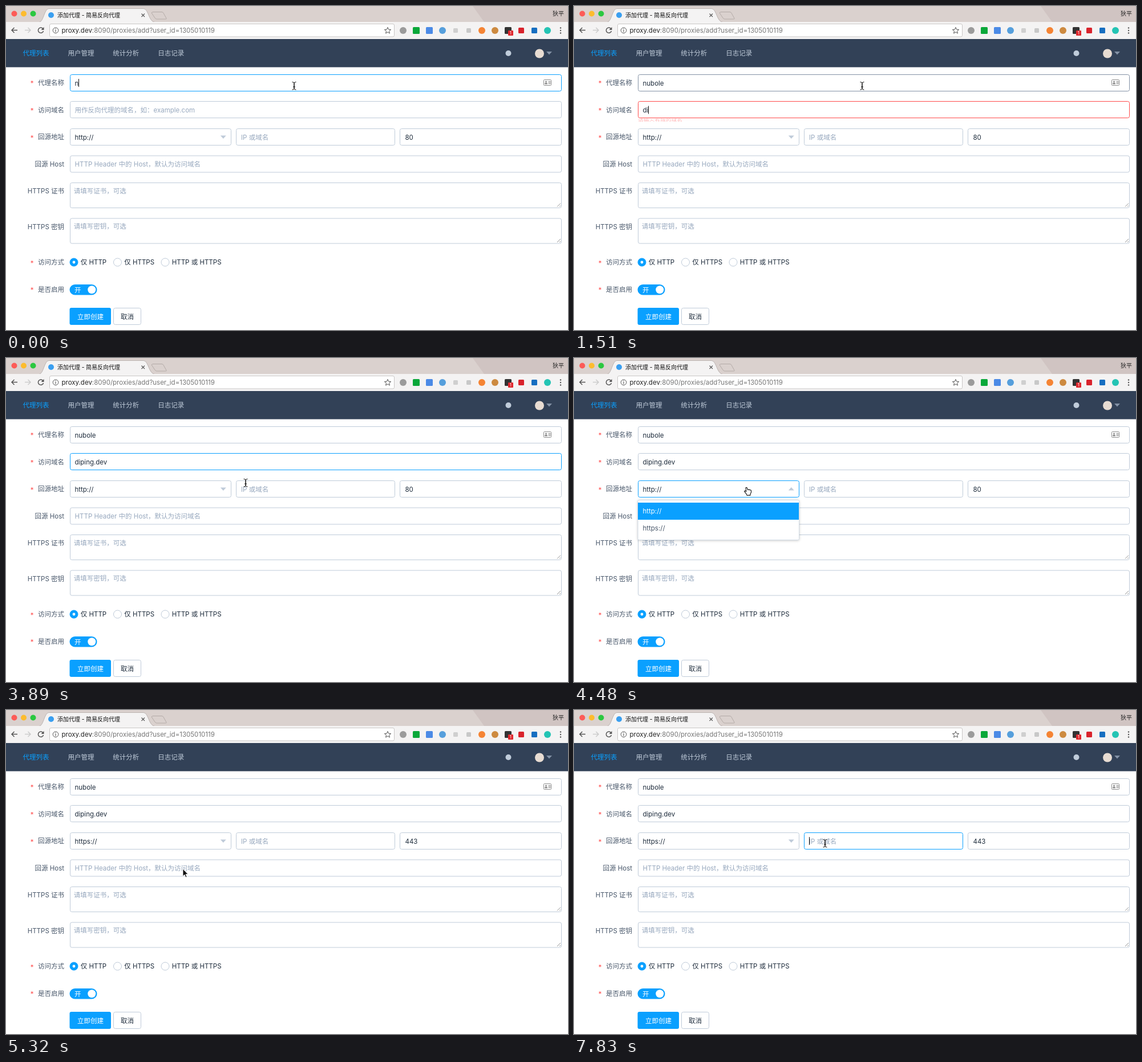
Write an HTML page that moves like this. It is 985 by 569 pixels and loops after 8 s.

```html
<!DOCTYPE html>
<html lang="zh-CN">
<head>
<meta charset="utf-8">
<title>添加代理</title>
<style>
  html, body { margin: 0; width: 100%; height: 100%; overflow: hidden; background: #fff; }
  svg { display: block; }
  text { font: 11.5px Inter, "Noto Sans CJK SC", "Noto Sans CJK", sans-serif; white-space: pre; }
  .small { font-size: 10px; }
  .error { font-size: 9.75px; }
</style>
</head>
<body>
<svg id="stage" width="985" height="569" viewBox="0 0 985 569"></svg>
<script>
const BLUE = '#0aa0ff', RED = '#ff4949', LINE = '#bfcbd9', HOVER = '#8391a5';
const INK = '#1f2d3d', LABEL = '#48576a', HINT = '#97a8be';
const LOOP = 8000;

const text = (x, y, s, fill = INK, extra = '') => `<text x="${x}" y="${y}" fill="${fill}" ${extra}>${s}</text>`;
const rect = (x, y, w, h, fill, extra = '') => `<rect x="${x}" y="${y}" width="${w}" height="${h}" fill="${fill}" ${extra}/>`;
const circle = (x, y, r, fill, extra = '') => `<circle cx="${x}" cy="${y}" r="${r}" fill="${fill}" ${extra}/>`;
const path = (d, stroke, extra = '') => `<path d="${d}" fill="none" stroke="${stroke}" ${extra}/>`;
const shape = (d, fill, extra = '') => `<path d="${d}" fill="${fill}" ${extra}/>`;
const box = (x, y, w, h = 29, id = '') => rect(x, y, w, h, '#fff', `id="${id}" rx="3" stroke="${LINE}"`);
const label = (y, s, required) =>
  text(102, y, s, LABEL, 'text-anchor="end"') + (required ? text(42.8, y + 1.5, '*', RED) : '');
const radio = (x, s, on) =>
  circle(x, 450, 7, on ? BLUE : '#fff', `stroke="${on ? BLUE : LINE}"`) +
  (on ? circle(x, 450, 2.4, '#fff') : '') + text(x + 11.7, 454.2, s);
const textarea = (y, s) => box(112.5, y, 861, 44) + text(118.8, y + 18.2, s, HINT) +
  path(`M966 ${y + 42}l6-6M970 ${y + 42}l2-2`, '#777', 'stroke-width=".8"');

function browser() {
  const icons = [
    [696, '#9b9b9b', 1], [719, '#0aa83a'], [742, '#4b8ae6'], [765, '#569fdc', 1],
    [788, '#cfcfcf', 0, 4], [811, '#c8c8c8', 0, 4], [834, '#f58434', 1], [857, '#cd8a40', 1],
    [880, '#333'], [903, '#d9232c', 0, 5], [926, '#176fc1', 0, 5], [949, '#24c4b4', 1]
  ];
  return rect(0, 0, 985, 28, '#dad1ce') + shape('M818 0H985V28H838Z', '#d0c4c2') +
    ['#fc5b57', '#fdbc2e', '#2bc840'].map((c, i) => circle(14.5 + 16.5 * i, 13.5, 5, c)).join('') +
    shape('M58 28.5C66 28 67 5 75 4.5H241C250 5 250 28 261 28.5Z', '#f4f3f3', 'stroke="#aaa19e" stroke-width=".7"') +
    path('M255 12q1-1.500 3-1.500h15q2 0 3 2l5 9q.8 1.500-1.500 1.500h-15q-2.500 0-3.500-2z', '#aaa19e', 'stroke-width=".8"') +
    rect(0, 28, 985, 30, '#f4f3f3') +
    circle(79, 16, 5, '#3a9ff0') +
    text(90, 19.8, '添加代理 - 简易反向代理', '#111', 'class="small" font-weight="500" style="font-weight:500"') +
    path('M237.500 13.500l5.500 5.500m0-5.500l-5.500 5.500', '#555', 'stroke-width="1.1"') +
    text(958, 17.2, '狄平', '#222', 'class="small"') +
    path('M20 42.500H10m4.500-4.500l-4.500 4.500 4.500 4.500', '#555', 'stroke-width="1.5"') +
    path('M33 42.500h10m-4.500-4.500l4.500 4.500-4.500 4.500', '#ccc', 'stroke-width="1.5"') +
    path('M65 40a4.700 4.700 0 1 0 .6 4', '#555', 'stroke-width="1.5"') + shape('M66.500 37v5h-5z', '#555') +
    rect(76.5, 31.5, 604, 22.5, '#fff', 'id="omnibox" rx="2.5"') +
    rect(97, 36, 276, 14, '#a9cef6', 'id="selection"') +
    circle(87, 42.800, 4.800, 'none', 'stroke="#555"') + path('M87 42v3.500M87 39.800v1.200', '#555', 'stroke-width="1.2"') +
    text(97.5, 47, '<tspan fill="#222">proxy.dev</tspan>:8090/proxies/add?user_id=1305010119', '#767676') +
    path('M669 37.500l1.600 3.700 4 .3-3.100 2.600 1 3.900-3.500-2.100-3.500 2.100 1-3.900-3.100-2.600 4-.3z', '#555') +
    icons.map(([x, c, round, r = 6]) =>
      round ? circle(x, 43, r, c) : rect(x - r, 43 - r, 2 * r, 2 * r, c, 'rx="1.5"')).join('') +
    rect(880, 43, 9, 9, '#e0282e', 'rx="1"') +
    text(882.7, 50.3, '1', '#fff', 'style="font-size:7.5px"') +
    [38.500, 43, 47.500].map(y => circle(972, y, 1.2, '#555')).join('');
}

function navigation() {
  return rect(0, 58, 985, 49.500, '#324157') +
    ['代理列表', '用户管理', '统计分析', '日志记录'].map((s, i) =>
      text(29.500 + 78.900 * i, 87.200, s, i ? LINE : BLUE)).join('') +
    circle(880.500, 83, 5, '#c0ccda') + circle(935, 83.500, 8, '#e8dcd2') +
    shape('M947 80h10l-5 5.500z', '#8492a6');
}

function form() {
  return label(138.800, '代理名称', 1) + box(112.5, 120.5, 861, 29, 'nameBox') + text(120.5, 139.500, '', INK, 'id="nameText"') +
    rect(942.500, 129.500, 13, 10, '#fff', 'rx="1" stroke="#8c8c8c"') + circle(946.500, 133, 1.400, '#8c8c8c') +
    shape('M944 137.500q0-3 2.500-3t2.500 3z', '#8c8c8c') + path('M950.500 132.500h4m-4 2h4m-4 2h4', '#8c8c8c') +
    label(186.500, '访问域名', 1) + box(112.5, 167.5, 861, 29, 'domainBox') +
    text(120.5, 187.200, '用作反向代理的域名，如：example.com', HINT, 'id="domainHint"') +
    text(120.5, 187.200, '', INK, 'id="domainText"') +
    path('', '#ee3b33', 'id="spelling" stroke-width="1.4" stroke-dasharray="1.5 1"') +
    `<g id="error">${text(112, 11.500, '请输入有效的域名', RED, 'class="error"')}</g>` +
    label(234.200, '回源地址', 1) + box(112.5, 215.5, 282, 29, 'selectBox') + text(120.5, 234.700, '', INK, 'id="schemeText"') +
    shape('M-5-2.500h10l-5 5.500z', LINE, 'id="arrow"') +
    box(403.5, 215.5, 278, 29, 'hostBox') + text(412, 234.700, 'IP 或域名', HINT) +
    box(690.5, 215.5, 283) + text(699.5, 234.700, '', INK, 'id="portText"') +
    label(281.700, '回源 Host') + box(112.5, 263, 861) + text(120.5, 282.300, 'HTTP Header 中的 Host，默认为访问域名', HINT) +
    label(329, 'HTTPS 证书') + textarea(310.5, '请填写证书，可选') +
    label(391.500, 'HTTPS 密钥') + textarea(373, '请填写密钥，可选') +
    label(454, '访问方式', 1) + radio(119, '仅 HTTP', 1) + radio(195.500, '仅 HTTPS') + radio(279, 'HTTP 或 HTTPS') +
    label(501.800, '是否启用', 1) + rect(111.500, 489, 48, 18.500, BLUE, 'rx="9.25"') +
    text(120, 502.500, '开', '#fff') + circle(150.300, 498.300, 7, '#fff') +
    rect(111.500, 530, 72.500, 30, BLUE, 'rx="3"') + text(125, 549.500, '立即创建', '#fff') +
    box(188.5, 530.5, 48) + text(201, 549.500, '取消', INK);
}

function overlays() {
  const menu = rect(112, 249.5, 282.5, 70, '#fff', `rx="2" stroke="#d1dbe5" style="filter:drop-shadow(0 1px 2px #0003)"`) +
    rect(112, 254, 282, 30, BLUE) + text(120.5, 273.300, 'http://', '#fff') +
    rect(112, 284, 282, 30, '#e1e6ee', 'id="secondItem"') + text(120.5, 303, 'https://', LABEL);
  const beam = path('M-3.500-6.500q3.500 0 3.500 2v9.500q0 2-3.500 2M3.500-6.500q-3.500 0-3.500 2v9.500q0 2 3.500 2M-2 2h4', '#111', 'id="beam"');
  const hand = shape('M-3-6q1.500-1.500 2.500.5l1 3q1-1 2 0 1-.8 2 .4 1.800-.6 2 1.200v3l-1.500 3v2h-6l-1-2.500-3.500-4.500q.5-1.700 2.500-.3l.8.700z', '#fff',
    'id="hand" stroke="#111" stroke-width="1.1" stroke-linejoin="round"');
  const arrow = shape('M0-6v13l3-2.800 2 4.800 2-1-2-4.500h4z', '#111', 'id="pointer" stroke="#fff" stroke-width=".8"');
  return `<g id="menu">${menu}</g>` + rect(0, 0, 1, 14, '#111', 'id="caret"') + `<g id="cursor">${beam}${hand}${arrow}</g>`;
}

const stage = document.getElementById('stage');
stage.innerHTML = browser() + navigation() + form() + overlays();
const el = {};
for (const node of stage.querySelectorAll('[id]')) if (node.id) el[node.id] = node;

const set = (id, attrs) => { for (const k in attrs) el[id].setAttribute(k, attrs[k]); };
const show = (id, on) => set(id, { visibility: on ? 'visible' : 'hidden' });

// Value of the last step [time, value] that has been reached.
const step = (t, steps) => steps.reduce((value, [start, v]) => t >= start ? v : value, steps[0][1]);

const nameLength = [[0, 1], [140, 2], [300, 3], [450, 5], [610, 6]];
const domainLength = [[0, 0], [1360, 1], [1510, 2], [1650, 3], [1800, 4], [2100, 5], [2240, 6],
  [2390, 7], [2540, 8], [2840, 9], [2990, 10]];
const focus = [[0, 'name'], [910, 'domain'], [4330, 'select'], [4720, ''], [5980, 'host'], [6430, 'url'], [7440, 'host']];
const errorScale = [[0, 0], [1360, .1], [1510, .45], [1650, .9], [1800, 1], [2990, .5], [3140, 0]];
const menuScale = [[0, 0], [4330, .5], [4480, 1], [5170, .5], [5320, 0]];
const mouse = [[0, [505, 140]], [3440, [500, 145]], [3590, [476, 170]], [3740, [446, 198]], [3890, [420, 219]],
  [4040, [380, 228]], [4190, [335, 232]], [4330, [304, 234]], [4720, [287, 275]], [4870, [281, 305]],
  [5320, [310, 285]], [5480, [385, 250]], [5680, [440, 234]]];
const caretHidden = [[0, 0], [3590, 1], [4040, 0], [7060, 1], [7640, 0]];

function draw(t) {
  const focused = step(t, focus), [mx, my] = step(t, mouse);
  const opened = step(t, menuScale), error = step(t, errorScale), secure = t >= 5170;
  const inRow = (top, left, right) => my > top && my < top + 30 && mx > left && mx < right;
  const border = (name, hovered) => focused === name ? BLUE : hovered ? HOVER : LINE;

  el.nameText.textContent = 'nubole'.slice(0, step(t, nameLength));
  el.domainText.textContent = 'diping.dev'.slice(0, step(t, domainLength));
  el.schemeText.textContent = secure ? 'https://' : 'http://';
  el.portText.textContent = secure ? '443' : '80';
  show('domainHint', t < 1360);

  const overSelect = inRow(215, 112, 395), overHost = inRow(215, 403, 682);
  set('nameBox', { stroke: border('name', inRow(120, 112, 974)) });
  set('domainBox', { stroke: t >= 1510 && t < 2990 ? RED : border('domain', inRow(167, 112, 974)) });
  set('selectBox', { stroke: border('select', overSelect) });
  set('hostBox', { stroke: border('host', overHost && t >= 4000) });

  set('error', { transform: `translate(0 197) scale(1 ${error})`, opacity: error });
  show('spelling', t >= 2390 && t < 2840);
  const domainEnd = 120.5 + el.domainText.getComputedTextLength();
  set('spelling', { d: `M121 188.800H${domainEnd}` });

  show('menu', opened);
  set('menu', { transform: `translate(0 249) scale(1 ${opened}) translate(0 -249)`, opacity: opened });
  set('secondItem', { opacity: my > 284 && my < 314 ? 1 : 0 });
  set('arrow', { transform: `translate(380.800 230) scale(1 ${t >= 4330 && !secure ? -1 : 1})` });

  const urlActive = focused === 'url';
  show('selection', urlActive);
  set('omnibox', { stroke: urlActive ? '#4f9bea' : '#c9c6c5', 'stroke-width': urlActive ? 1.6 : 1 });

  const caretAt = {
    name: [120.5 + el.nameText.getComputedTextLength(), 128],
    domain: [domainEnd, 175.500],
    host: [412, 223]
  }[focused];
  show('caret', caretAt && !step(t, caretHidden));
  if (caretAt) set('caret', { x: Math.round(caretAt[0]), y: caretAt[1] });

  const overText = inRow(120, 112, 974) || inRow(167, 112, 974) || overHost;
  const overHand = overSelect || (opened && my > 250);
  set('cursor', { transform: `translate(${mx} ${my})` });
  show('beam', overText);
  show('hand', !overText && overHand);
  show('pointer', !overText && !overHand);
}

function tick() {
  draw(performance.now() % LOOP);
  requestAnimationFrame(tick);
}
tick();
</script>
</body>
</html>
```
